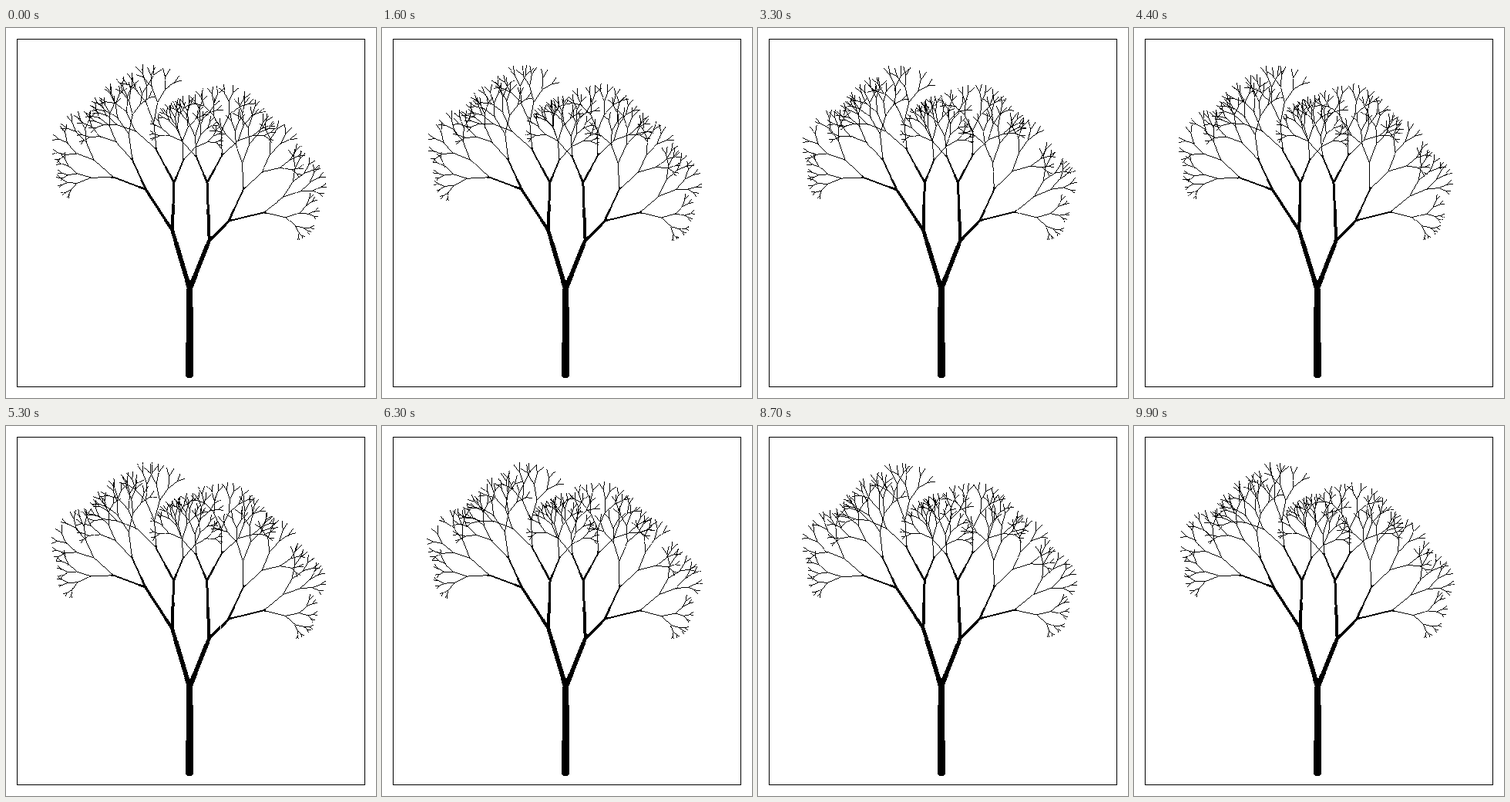
These frames come from a looping animation (480x480 px, 10000 ms). An HTML page with a canvas:

```html
<!DOCTYPE html>
<html lang="en">
<head>
<meta charset="utf-8">
<title>Swaying tree</title>
<style>
  html, body { margin: 0; width: 100%; height: 100%; overflow: hidden; background: #fff; }
  canvas { display: block; }
</style>
</head>
<body>
<canvas id="stage" width="480" height="480"></canvas>
<script>
const ctx = document.getElementById('stage').getContext('2d');
const LOOP = 10000, STEP = 100, DEPTH = 8, TAU = 2 * Math.PI;
const ROOT = { x: 238, y: 450 };
const BASE_WIDTH = 10.4;

// Main forks, level by level; the branches of fork i end at forks 2i and 2i + 1.
const FORKS = [
  [238, 338],
  [215, 262], [263, 275],
  [181, 210], [217, 200], [260, 200], [288, 250],
  [138, 194], [163, 171], [194, 158], [229, 171],
  [246, 167], [279, 165], [307, 209], [333, 239]
];

function rand(i, salt) {
  const v = Math.sin(i * 12.9898 + salt * 78.233) * 43758.5453;
  return v - Math.floor(v);
}

// Whole cycles per loop keep the wave seamless; t runs from 0 to 1.
const wave = (t, cycles, phase) => Math.cos(TAU * (cycles * t + phase));

const widthAt = depth => Math.max(1, BASE_WIDTH * 0.62 ** depth);

// Hard-edged tapered line made of one-pixel slices.
function branch(p, q, w0, w1) {
  const dx = q.x - p.x, dy = q.y - p.y;
  const major = Math.max(Math.abs(dx), Math.abs(dy));
  const steps = Math.max(1, Math.round(major));
  const slant = w0 > 1.6 ? Math.hypot(dx, dy) / major : 1;
  const steep = Math.abs(dy) > Math.abs(dx);
  for (let i = 0; i <= steps; i++) {
    const k = i / steps, x = p.x + dx * k, y = p.y + dy * k;
    const size = Math.max(1, Math.round((w0 + (w1 - w0) * k) * slant));
    if (steep) ctx.fillRect(Math.round(x - size / 2), Math.round(y), size, 1);
    else ctx.fillRect(Math.round(x), Math.round(y - size / 2), 1, size);
  }
}

function lean([x, y], angle) {
  const dx = x - ROOT.x, dy = y - ROOT.y;
  const c = Math.cos(angle), s = Math.sin(angle);
  return { x: ROOT.x + dx * c - dy * s, y: ROOT.y + dx * s + dy * c };
}

// Twigs turn off to both sides of their parent; upright ones stay longer.
function twig(i, depth, parent, t) {
  const side = i % 2 ? 1 : -1;
  const cycles = 7 + Math.floor(rand(i, 1) * 6);
  const flutter = 0.02 * (depth - 3) * wave(t, cycles, rand(i, 2));
  const angle = parent.heading + side * (0.3 + 0.2 * rand(i, 3)) + flutter;
  const ratio = 0.62 - 0.1 * Math.sin(angle) + 0.08 * rand(i, 4);
  const length = parent.length * ratio;
  return {
    x: parent.x + Math.cos(angle) * length,
    y: parent.y + Math.sin(angle) * length
  };
}

function grow(i, depth, parent, t, tilt) {
  const fork = FORKS[i - 1];
  const end = fork ? lean(fork, tilt) : twig(i, depth, parent, t);
  const width = widthAt(depth);
  branch(parent, end, width, Math.max(1, width * 0.77));
  if (depth === DEPTH) return;
  const dx = end.x - parent.x, dy = end.y - parent.y;
  end.heading = Math.atan2(dy, dx);
  end.length = Math.hypot(dx, dy);
  grow(2 * i, depth + 1, end, t, tilt);
  grow(2 * i + 1, depth + 1, end, t, tilt);
}

function draw(t) {
  ctx.fillStyle = '#fff';
  ctx.fillRect(0, 0, 480, 480);
  ctx.strokeStyle = ctx.fillStyle = '#000';
  ctx.strokeRect(14.5, 14.5, 451, 451);
  for (let k = 1; k <= 3; k++) ctx.fillRect(ROOT.x - 6 + k, ROOT.y + k, 12 - 2 * k, 1);
  grow(1, 0, ROOT, t, 0.0045 * wave(t, 19, 0.08));
}

const start = performance.now();
function tick() {
  const ms = (performance.now() - start) % LOOP;
  draw(Math.floor(ms / STEP) * STEP / LOOP);
  requestAnimationFrame(tick);
}
tick();
</script>
</body>
</html>
```
